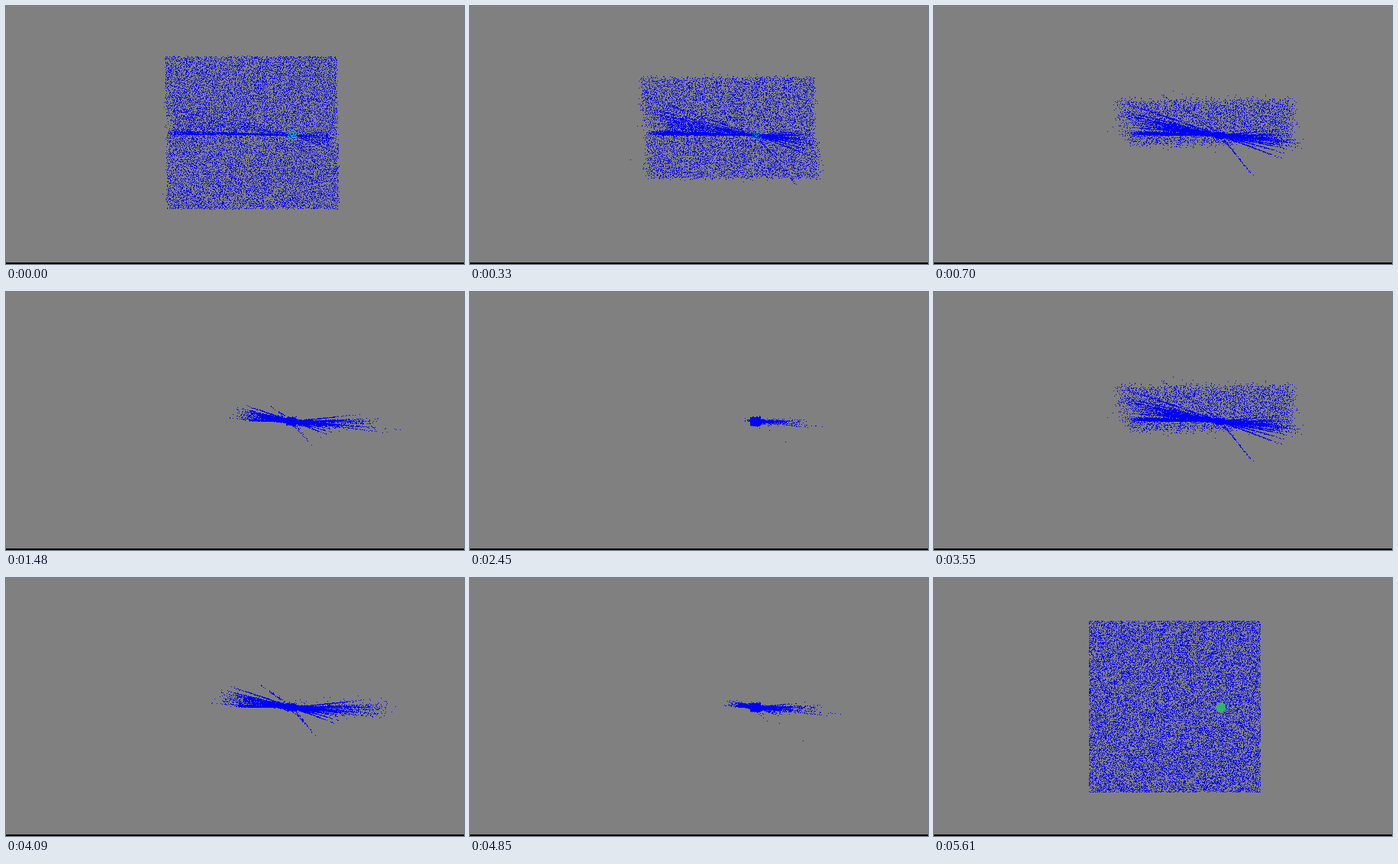
Animation of 600 by 338 pixels, one loop 5.64 s. Source, as a matplotlib script:

```python
import matplotlib.pyplot as plt
import numpy as np
from matplotlib.animation import FuncAnimation

W, H, DPI = 600, 338, 100
STEP, FRAMES = 30, 188
RESTARTS = (-120, 2730, 5610)      # ms at which the swarm is dealt out again

GRAY, BLACK, BLUE = (128, 128, 128), (0, 0, 0), (0, 0, 255)
GREEN, TEAL = (0, 205, 105), (0, 175, 175)

SIDE, LEFT, TOP = 225, 203, 56
GOAL = np.array([375, 169])
GOAL_RADIUS = 6.5
AGENTS = 20000

rng = np.random.default_rng(7)

# Deal agents onto distinct pixels, leaving the goal free.
rows, cols = np.divmod(np.arange(SIDE * SIDE), SIDE)
cells = np.column_stack([LEFT + cols, TOP + rows])
in_goal = np.hypot(*(cells - GOAL).T) < GOAL_RADIUS
start = rng.choice(cells[~in_goal], AGENTS, replace=False)
food = cells[in_goal]
food = food[rng.random(len(food)) < 0.65]
food_life = rng.uniform(0, 700, len(food))

u, v = (start - GOAL).T
upper = v < 0
right = u + 0.55 * np.abs(v) > 0

# First leg: constant drift towards the middle, the lower half faster.
drift = np.where(upper[:, None], (0.050, 0.084), (0.064, -0.124))
stray = np.where(rng.random(AGENTS) < 0.012, 0.022, 0.006)
drift = drift + rng.normal(0, (1, 0.7), (AGENTS, 2)) * stray[:, None]

# Second leg: follow one of a few rays through the goal.
RAYS = {
    (True, False): (0.05, 0.09, 0.12, 0.15, 0.18, 0.21, 0.21, 0.25, 0.34),
    (True, True): (-0.1, -0.03, -0.01, 0, 0, 0.03, 0.07, 0.08, 0.12),
    (False, False): (0.03, 0.03, 0.02, 0.01),
    (False, True): (0.06, 0.1, 0.1, 0.16, 0.2, 0.28, 0.38),
}
STEEP = {(True, False): 0.7, (False, True): 1.25}

slope = np.zeros(AGENTS)
for side, slopes in RAYS.items():
    here = np.flatnonzero((upper == side[0]) & (right == side[1]))
    slope[here] = rng.choice(slopes, len(here)) + rng.normal(0, 0.006, len(here))
    if side in STEEP:
        outer = here[np.abs(v[here]) > STEEP[side] * np.abs(u[here])]
        few = outer[rng.random(len(outer)) < 0.06]
        slope[few] = STEEP[side] + rng.normal(0, 0.02, len(few))

meet = (slope * u - v) / (drift[:, 1] - slope * drift[:, 0])
meet = np.clip(meet, 0, 2400)
joint = np.column_stack([u, v]) + drift * meet[:, None]
reach = np.hypot(*joint.T) + 1e-6
heading = joint / reach[:, None]
pace = np.where(joint[:, 0] > 0,
                rng.uniform(0.5, 1.0, AGENTS),
                rng.uniform(1.0, 1.3, AGENTS))
rest = np.column_stack([rng.uniform(-8, 5, AGENTS), rng.normal(0, 1.8, AGENTS)])


def swarm(age):
    """Positions of all agents at an age in ms."""
    first = start + drift * age
    t = np.maximum(age - meet, 0)
    r = np.maximum((reach + 100) * np.exp(-0.00045 * pace * t) - 100, 0)
    blend = np.exp(-r / 14) * (1 - np.exp(-t / 400))
    second = GOAL + heading * r[:, None] + rest * blend[:, None]
    return np.where((age < meet)[:, None], first, second)


def stamp(img, points, color):
    x, y = np.rint(points).astype(int).T
    ok = (x >= 0) & (x < W) & (y >= 0) & (y < H)
    img[y[ok], x[ok]] = color


def render(i):
    now = i * STEP
    age = now - max(s for s in RESTARTS if s <= now)
    img = np.full((H, W, 3), GRAY, np.uint8)
    stamp(img, swarm(age), BLUE)
    stamp(img, food[food_life >= age], TEAL if age else GREEN)
    img[H - 2:] = BLACK
    return img


fig = plt.figure(figsize=(W / DPI, H / DPI), dpi=DPI)
ax = fig.add_axes([0, 0, 1, 1])
ax.axis("off")
picture = ax.imshow(render(0), interpolation="nearest", aspect="auto")


def update(i):
    picture.set_data(render(i))
    return [picture]


anim = FuncAnimation(fig, update, frames=FRAMES, interval=STEP,
                     repeat=True, repeat_delay=0, blit=True)
plt.show()
```
